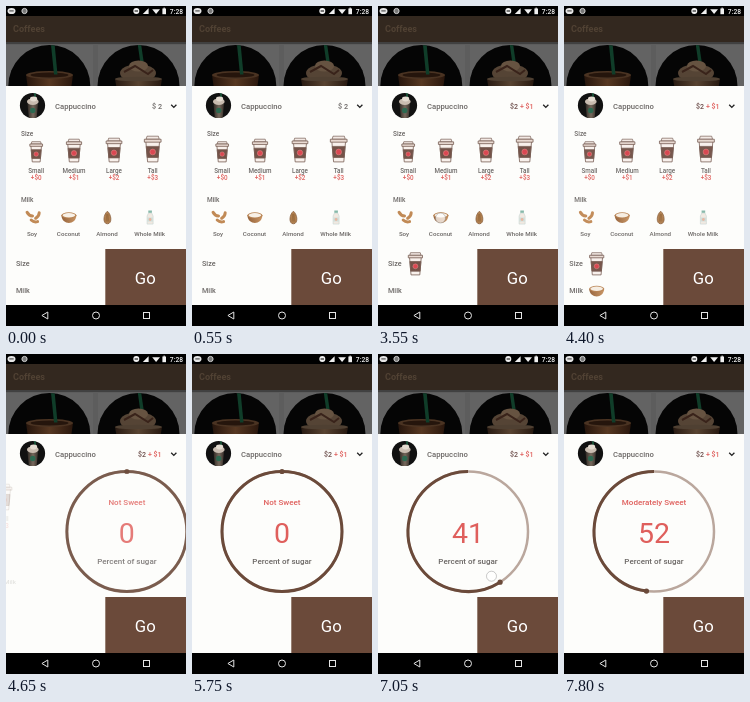
An HTML page with a canvas for the animation above (8 s loop, 180 by 320 pixels).

```html
<!DOCTYPE html>
<html lang="en">
<head>
<meta charset="utf-8">
<title>Coffee order</title>
<style>
html, body { margin: 0; width: 100%; height: 100%; overflow: hidden; background: #000; }
canvas { display: block; width: 180px; height: 320px; }
</style>
</head>
<body>
<canvas id="stage"></canvas>
<script>
const W = 180, H = 320, LOOP = 8000;
const BROWN = '#6b4a3a', RED = '#df5f5c', GREY = '#6b6765', INK = '#765d54', PAPER = '#fdfdfb';
const canvas = document.getElementById('stage');
const c = canvas.getContext('2d');
const dpr = window.devicePixelRatio || 1;
canvas.width = W * dpr;
canvas.height = H * dpr;

const clamp = v => Math.max(0, Math.min(1, v));
const span = (t, a, b) => clamp((t - a) / (b - a));
const ease = p => p < 0.5 ? 4 * p ** 3 : 1 - (2 - 2 * p) ** 3 / 2;
const mix = (a, b, p) => a + (b - a) * p;

function rect(x, y, w, h, fill) {
  c.fillStyle = fill;
  c.fillRect(x, y, w, h);
}

function paint(fill, stroke, width = 1) {
  if (fill) { c.fillStyle = fill; c.fill(); }
  if (stroke) { c.strokeStyle = stroke; c.lineWidth = width; c.stroke(); }
}

function oval(x, y, rx, ry, fill, stroke, width, turn = 0) {
  c.beginPath();
  c.ellipse(x, y, rx, ry, turn, 0, Math.PI * 2);
  paint(fill, stroke, width);
}

const dot = (x, y, r, fill, stroke, width) => oval(x, y, r, r, fill, stroke, width);

function poly(points, fill, stroke, width, open) {
  c.beginPath();
  points.forEach(([x, y], i) => i ? c.lineTo(x, y) : c.moveTo(x, y));
  if (!open) c.closePath();
  paint(fill, stroke, width);
}

function text(s, x, y, size, fill, align = 'center', weight = 500) {
  c.font = `${weight} ${size}px Roboto, sans-serif`;
  c.textAlign = align;
  c.fillStyle = fill;
  c.fillText(s, x, y);
}

// Runs draw shifted by (x, y), with the given opacity.
function at(x, y, alpha, draw) {
  if (alpha <= 0) return;
  c.save();
  c.translate(x, y);
  c.globalAlpha *= alpha;
  draw();
  c.restore();
}

function inCircle(x, y, r, draw) {
  c.save();
  c.beginPath();
  c.arc(x, y, r, 0, Math.PI * 2);
  c.clip();
  draw();
  c.restore();
}

function shade(x0, x1, stops) {
  const g = c.createLinearGradient(x0, 0, x1, 0);
  stops.forEach((s, i) => g.addColorStop(i / (stops.length - 1), s));
  return g;
}

function statusBar() {
  rect(0, 0, W, 10, '#000');
  oval(5.5, 5, 4, 3.1, '#e6e6e6');
  rect(3.3, 4.3, 4.4, 1.2, '#555');
  dot(18.5, 5, 2.6, '#777', '#d0d0d0', 1);
  dot(130.3, 5, 3, '#f0f0f0');
  rect(128.6, 4.5, 3.4, 1, '#000');
  poly([[136.8, 8], [142.6, 8], [142.6, 2.2]], '#f0f0f0');
  poly([[146.2, 3.2], [154, 3.2], [150.1, 8]], '#f0f0f0');
  rect(156.4, 2.5, 3.6, 5.7, '#f0f0f0');
  rect(157.4, 1.7, 1.6, 1, '#f0f0f0');
  text('7:28', 177, 7.6, 6.7, '#f0f0f0', 'right');
}

function backdrop() {
  rect(0, 10, W, 26, '#33281f');
  text('Coffees', 7, 26.2, 9.1, '#514234', 'left', 700);
  rect(0, 36, W, 46, '#5d5d5d');
  rect(0, 36, W, 2, '#414141');
  rect(0, 39, 87, 43, '#636363');
  rect(92, 39, 88, 43, '#636363');
  inCircle(43.3, 80, 41, () => {
    rect(0, 38, 90, 45, '#050505');
    poly([[20, 69], [67, 69], [64, 90], [23, 90]], shade(20, 67, ['#26150c', '#573822', '#2a170d']));
    oval(43.5, 69, 23.5, 4, '#4a3322');
    oval(43.5, 69, 19, 2.5, '#25150c');
    poly([[45, 39], [48.7, 39], [51.5, 68.5], [48, 68.5]], '#103d29');
  });
  inCircle(132.5, 80, 41, () => {
    rect(90, 38, 90, 45, '#050505');
    poly([[131.8, 39], [135.2, 39], [138, 58], [134.5, 58]], '#103d29');
    oval(132, 67, 18, 9, '#554435');
    oval(132.5, 60, 9.5, 5.5, '#665341');
    poly([[118, 66], [129, 60], [142, 68], [147, 64]], null, '#39231a', 2, true);
    poly([[109, 73], [156, 73], [153, 90], [112, 90]], shade(109, 156, ['#281a12', '#584331', '#271910']));
    oval(132.5, 73, 23.5, 2.3, '#4f4032');
  });
}

function header(t) {
  inCircle(26.5, 99.5, 12.6, () => {
    rect(13, 86, 28, 28, '#111');
    poly([[28, 86], [29.5, 86], [30, 93], [28.8, 93]], '#1c6945');
    poly([[21.5, 98], [32, 98], [30.5, 113], [23, 113]], shade(21, 33, ['#29241f', '#77695d', '#2b2520']));
    oval(26.8, 95.7, 5.8, 3.3, '#c9bcb0');
    oval(27.6, 93, 3.6, 2.4, '#e4dbd0');
    dot(26.7, 104.5, 2.7, '#2d6850');
  });
  text('Cappuccino', 49, 103, 7.7, GREY, 'left');
  const p = span(t, 2450, 2700);
  at(0, 0, 1 - p, () => text('$ 2', 156, 102.8, 7.2, GREY, 'right'));
  at(0, 0, p, () => {
    text('+ $1', 155.5, 102.7, 7, RED, 'right');
    text('$2', 132, 102.7, 7, '#694a47', 'left');
  });
  poly([[165.2, 98.7], [167.8, 101.4], [170.4, 98.7]], null, '#222', 1.3, true);
}

// Paper cup centred on the origin, w by h.
function cup(w, h) {
  const a = w / 2, top = -h / 2, low = h / 2;
  const side = y => mix(a * 0.84, a * 0.58, (y - top) / h);
  const band = (y0, y1, fill) => poly(
    [[-side(y0), y0], [side(y0), y0], [side(y1), y1], [-side(y1), y1]], fill, INK, 0.8);
  band(top + h * 0.2, low - 0.4, '#f8f0eb');
  band(top + h * 0.4, top + h * 0.82, '#745248');
  poly([[-a * 0.65, top + 0.4], [a * 0.65, top + 0.4], [a * 0.75, top + h * 0.13], [-a * 0.75, top + h * 0.13]], '#f3e9e4', INK, 0.7);
  poly([[-a + 0.4, top + h * 0.13], [a - 0.4, top + h * 0.13], [a - 0.4, top + h * 0.24], [-a + 0.4, top + h * 0.24]], '#eadbd3', INK, 0.8);
  dot(0, top + h * 0.61, w * 0.165, '#db4852', '#eba39c', 0.4);
}

function bean(x, y, turn) {
  at(x, y, 1, () => {
    c.rotate(turn);
    c.beginPath();
    c.moveTo(-3.3, -0.7);
    c.quadraticCurveTo(0, 1.2, 3.3, -0.7);
    c.lineCap = 'round';
    paint(null, '#c18a56', 3);
  });
}

function soy() {
  bean(-3, -2.8, 0.6);
  bean(5.6, -1.6, -1);
  bean(1.8, 4, 0.25);
}

function coconut() {
  c.beginPath();
  c.moveTo(-7.5, -2.2);
  c.bezierCurveTo(-7.2, 8, 7.2, 8, 7.5, -2.2);
  c.closePath();
  paint(shade(-7, 7, ['#96633b', '#c79362']));
  oval(0, -2.2, 7.5, 3, '#b98555');
  oval(0, -2.2, 6.3, 2.2, '#f8f1e7');
}

function almond() {
  c.beginPath();
  c.moveTo(0, -6.3);
  c.bezierCurveTo(4.2, -3, 5, 6.3, 0, 6.3);
  c.bezierCurveTo(-5, 6.3, -4.2, -3, 0, -6.3);
  paint('#b1804f', '#855a38', 0.7);
  [-1.3, 0, 1.3].forEach(x => poly([[x * 0.5, -3.5], [x, 4]], null, '#85592f', 0.4, true));
}

function bottle() {
  poly([[-1.6, -4.5], [1.6, -4.5], [3, -1.5], [3, 6.6], [-3, 6.6], [-3, -1.5]], '#f1e9e1', '#c4d3d0', 0.6);
  rect(-1.8, -7, 3.6, 2.3, '#86b8a9');
  rect(-2.7, 0, 5.4, 4, '#cfdfdb');
  dot(0, 2, 1.4, '#e7b7a2');
}

const sizes = [['Small', 30.2, 13.5, 21], ['Medium', 68, 16, 23.5], ['Large', 108, 16.5, 24.5], ['Tall', 146.7, 17.5, 26.5]];
const milks = [['Soy', 26, soy], ['Coconut', 62.5, coconut], ['Almond', 101, almond], ['Whole Milk', 143.7, bottle]];

function options(t) {
  text('Size', 15, 130, 6.5, GREY, 'left');
  sizes.forEach(([name, x, w, h], i) => {
    at(x, 156.3 - h / 2, 1, () => cup(w, h));
    text(name, x, 167, 6.3, GREY);
    text('+$' + i, x, 174, 6.3, RED);
  });
  text('Milk', 15, 196.2, 6.5, GREY, 'left');
  milks.forEach(([name, x, icon]) => {
    at(x + 0.4, 211.5, 1, icon);
    text(name, x, 230, 6.2, GREY);
  });
  text('Size', 10, 260.2, 7.2, GREY, 'left');
  text('Milk', 10, 287, 7.2, GREY, 'left');
  if (t >= 2400) {
    const p = ease(span(t, 2400, 2700));
    at(mix(68, 37.4, p), mix(144.5, 257.8, p), 1, () => cup(15, 23));
  }
  if (t >= 3580) {
    const p = ease(span(t, 3580, 3850));
    at(mix(62.9, 37.4, p), mix(211.5, 285, p), 1, coconut);
  }
}

const drag = [[5800, 0], [5900, 2], [6250, 14], [7050, 41], [7350, 50], [7500, 52]];

function sugar(t) {
  for (let i = 1; i < drag.length; i++) {
    const [t0, v0] = drag[i - 1], [t1, v1] = drag[i];
    if (t < t1) return mix(v0, v1, span(t, t0, t1));
  }
  return 52;
}

const angleOf = v => v / 50 * Math.PI - Math.PI / 2;

function dial(t) {
  const v = sugar(t), a = angleOf(v), r = 60, y = 177.5;
  dot(0, y, r, null, '#baa79d', 2.5);
  c.beginPath();
  c.arc(0, y, r, a, Math.PI * 1.5);
  paint(null, BROWN, 3);
  dot(r * Math.cos(a), y + r * Math.sin(a), 2.6, BROWN);
  const resting = 1 - span(t, 5750, 5900) + span(t, 7480, 7750);
  at(0, 0, resting, () => text(v < 20 ? 'Not Sweet' : 'Moderately Sweet', 0, 151.4, 8, RED));
  text(String(Math.round(v)), 0, 188.8, 28.5, RED, 'center', 400);
  text('Percent of sugar', 0, 209.8, 8, GREY);
}

function touch(x, y) {
  dot(x, y, 5, 'rgba(255,255,255,0.7)', 'rgba(125,125,125,0.5)', 0.8);
}

function touches(t) {
  if (t >= 2350 && t < 2450) touch(68, 146.5);
  if (t >= 3530 && t < 3620) touch(62.5, 212);
  if (t >= 5770 && t < 7460) {
    const a = angleOf(sugar(t)) + 0.08, r = 50.5;
    touch(90 + r * Math.cos(a), 177.5 + r * Math.sin(a));
  }
}

function navBar() {
  rect(0, 299, W, 21, '#000');
  poly([[35.9, 309.5], [41.8, 306], [41.8, 313]], null, '#e4e4e4', 1);
  dot(90, 309.5, 3.5, null, '#e4e4e4', 1);
  c.strokeRect(137.5, 306.5, 6, 6);
}

function draw(t) {
  c.setTransform(dpr, 0, 0, dpr, 0, 0);
  rect(0, 0, W, H, '#000');
  backdrop();
  statusBar();
  rect(0, 80, W, 219, PAPER);
  header(t);
  const p = ease(span(t, 4300, 4840));
  at(-W * p, 0, 1 - p, () => options(t));
  at(90 + W * (1 - p), 0, p, () => dial(t));
  rect(99.3, 243, 81, 56, BROWN);
  text('Go', 139.3, 277.5, 16.7, '#fff', 'center', 400);
  touches(t);
  navBar();
}

const start = performance.now();
function frame() {
  draw((performance.now() - start) % LOOP);
  requestAnimationFrame(frame);
}
frame();
</script>
</body>
</html>
```
